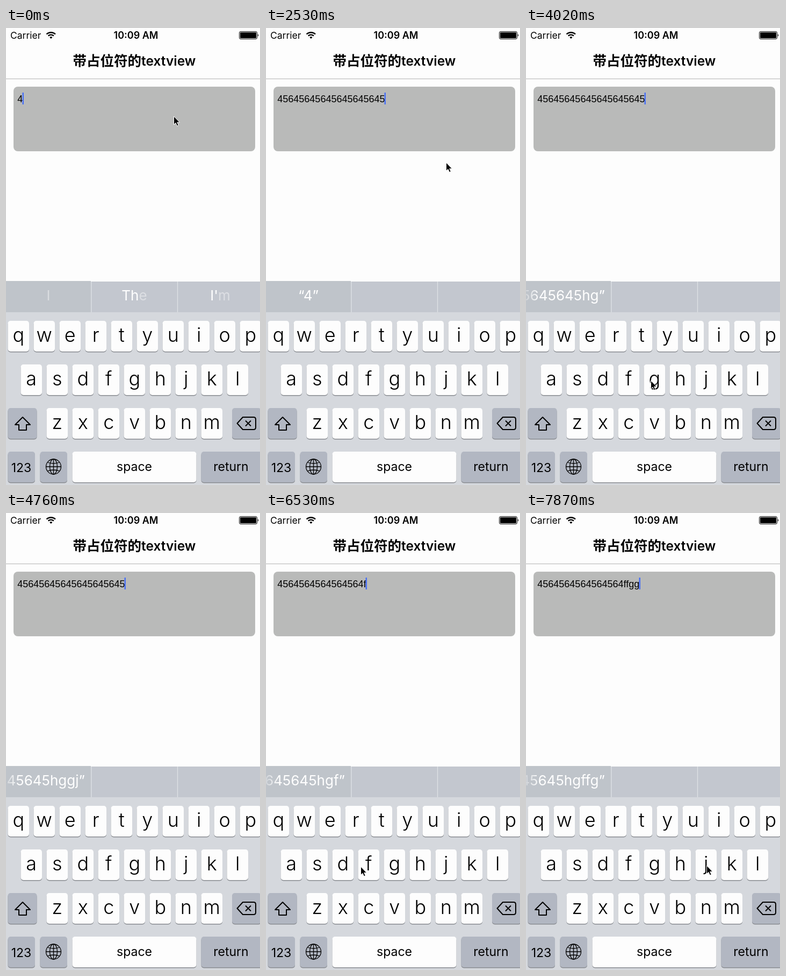
Write an HTML page that moves like this. It is 473 px wide and 849 px high and loops after 8000 ms.

```html
<!DOCTYPE html>
<html lang="zh">
<head>
<meta charset="utf-8">
<title>textview</title>
<style>
html, body { margin: 0; width: 100%; height: 100%; overflow: hidden; background: #fdfdfd }
svg { display: block; font-family: Inter, Roboto, sans-serif }
.key { font-size: 36px; font-weight: 300; text-anchor: middle }
.word { font-size: 23px; text-anchor: middle }
.hint { font-size: 26px; fill: url(#fade) }
.field { font: 18px "Liberation Sans", Arial, sans-serif }
.line { fill: none; stroke: #000; stroke-width: 2; stroke-linejoin: round }
.pop { filter: drop-shadow(0 1px 3px rgba(0, 0, 0, .28)) }
</style>
</head>
<body>
<svg width="473" height="849" viewBox="0 0 473 849">
  <defs>
    <linearGradient id="fade" gradientUnits="userSpaceOnUse" x1="-4" y1="0" x2="24" y2="0">
      <stop offset="0" stop-color="#fff" stop-opacity=".15"/>
      <stop offset="1" stop-color="#fff"/>
    </linearGradient>
  </defs>
  <rect width="473" height="849" fill="#fdfdfd"/>
  <text x="8" y="20" font-size="17.5">Carrier</text>
  <g fill="none" stroke="#000" stroke-width="2.4">
    <path d="M75.5 11.5a12 12 0 0 1 16.500 0M78.600 14.700a7.500 7.500 0 0 1 10.300 0"/>
    <path d="M83.800 20l-2.600-2.800a4 4 0 0 1 5.200 0z" fill="#000" stroke="none"/>
  </g>
  <text x="242" y="20" font-size="18" font-weight="600" text-anchor="middle">10:09 AM</text>
  <rect x="434.500" y="6.500" width="33" height="14" rx="2.500" fill="none" stroke="#000"/>
  <rect x="436" y="8" width="30" height="11" rx="1"/>
  <path d="M469 11q2.500 2.500 0 5z"/>
  <text x="124.500" y="70" font-size="25.500" font-weight="600" style="font-family:'Noto Sans CJK SC','Noto Sans CJK',sans-serif">带占位符的</text>
  <text x="252" y="70" font-size="24.500" font-weight="600">textview</text>
  <path d="M0 94.500H473" stroke="#b3b3b3"/>
  <rect x="14" y="109" width="450" height="120" rx="8" fill="#b9bab9"/>
  <rect y="471" width="473" height="57" fill="#c3c7cf"/>
  <rect y="470" width="158" height="58" fill="#bfc4ca"/>
  <path d="M158.800 471V528M319.500 471V528" stroke="#dfe2e6" stroke-width="1.300"/>
  <rect y="528" width="473" height="321" fill="#d5d8dd"/>
  <g id="keys"></g>
  <g id="live"></g>
</svg>
<script>
const STEP = 148.5, LOOP = 8000;
const GREY = '#b2b7c2', WHITE = '#fdfdfd';
const $ = id => document.getElementById(id);

const label = (s, x, y, cls, extra = '') => `<text class="${cls}" x="${x}" y="${y}" ${extra}>${s}</text>`;
const cap = (x, y, w, fill) =>
  `<rect x="${x}" y="${y + 1.5}" width="${w}" height="57" rx="5" fill="#898c91"/>
   <rect x="${x}" y="${y}" width="${w}" height="57" rx="5" fill="${fill}"/>`;

const keyX = {};
function row(letters, left, y) {
  return [...letters].map((c, i) => {
    const x = left + 48 * i;
    keyX[c] = x + 19.75;
    return cap(x, y, 39.5, WHITE) + label(c, x + 19.75, y + 38.5, 'key');
  }).join('');
}

const eraseKey = pressed => cap(421, 706, 54, pressed ? WHITE : GREY) +
  `<path class="line" d="M430.500 734.500L441 723H461q4 0 4 4V742q0 4-4 4H441z" ${pressed ? 'style="fill:#000"' : ''}/>
   <path class="line" d="M446 729.500l10 10m0-10l-10 10" ${pressed ? 'style="stroke:#fff"' : ''}/>`;

$('keys').innerHTML =
  row('qwertyuiop', 3.5, 544) + row('asdfghjkl', 27.5, 625) + row('zxcvbnm', 75.5, 706) +
  cap(3.5, 706, 54, GREY) + '<path class="line" d="M31 723L45 737H38V747H24V737H17z"/>' +
  eraseKey(false) +
  cap(3.5, 787, 50.5, GREY) + label('123', 28.5, 825, 'word') +
  cap(63.5, 787, 50.5, GREY) +
  `<g class="line" style="stroke-width:1.300"><circle cx="88.500" cy="815" r="14"/>
   <ellipse cx="88.500" cy="815" rx="7" ry="14"/>
   <path d="M88.500 801v28M74.500 815h28M77.500 807q11 4 22 0M77.500 823q11-4 22 0"/></g>` +
  cap(123.5, 787, 231, WHITE) + label('space', 239, 823, 'word') +
  cap(363.5, 787, 115, GREY) + label('return', 419, 823, 'word');

// Each list holds [step, value]; a value lasts until the next entry.
const hints = [
  [0, ["I", "The", "I'm"]], [2, ['“4”']], [18, '45645646”'], [24, '45645645h”'],
  [27, '5645645hg”'], [29, '645645hgg”'], [31, '45645hggj”'], [36, '645645hgg”'],
  [38, '5645645hg”'], [43, '645645hgf”'], [45, '45645hgff”'], [47, '45645hgffg”']
];
const pointer = [
  [0, [312, 164]], [17, [335, 250]], [18, [372, 400]], [19, [385, 530]], [20, [350, 620]],
  [21, [300, 650]], [22, [272, 653]], [25, [245, 655]], [26, [232, 655]], [29, [290, 656]],
  [30, [332, 656]], [32, null], [33, [360, 670]], [34, [415, 712]], [35, [443, 733]],
  [39, [370, 715]], [40, [255, 678]], [41, [176, 657]], [45, [228, 655]], [47, [300, 648]],
  [50, [322, 653]], [51, [336, 655]]
];
const popups = { 23: 'h', 24: 'h', 26: 'g', 28: 'g', 30: 'j', 42: 'f', 44: 'f',
  45: 'g', 47: 'g', 48: 'h', 51: 'j', 52: 'j' };
const typedAt = [43, 44, 46, 47];

const at = (list, n) => list.filter(e => e[0] <= n).pop()[1];

function fieldText(n) {
  const size = n < 35 ? Math.min(20, 1 + Math.round(2.25 * n)) : Math.max(16, 54 - n);
  return '456'.repeat(7).slice(0, size) + 'ffgg'.slice(0, typedAt.filter(s => s <= n).length);
}

function textField(n) {
  const s = fieldText(n);
  const width = [...s].reduce((w, c) => w + (c === 'f' ? 5 : 10), 0);
  return label(s, 21.3, 138, 'field') +
    `<rect x="${20.5 + width}" y="120" width="2.500" height="22" fill="#4870f5" opacity="${n === 22 ? .7 : 1}"/>`;
}

function hintBar(n) {
  const h = at(hints, n);
  if (typeof h === 'string') return label(h, n < 24 ? 138 : 147, 506, 'hint', 'text-anchor="end"');
  return h.map((w, i) => {
    const s = n ? w : `${w.slice(0, -1)}<tspan fill-opacity=".42">${w.slice(-1)}</tspan>`;
    return label(s, 79 + 160 * i, 506, 'hint', 'text-anchor="middle"');
  }).join('');
}

const popup = c => `<g transform="translate(${keyX[c]})">
  <path class="pop" fill="${WHITE}" d="M-29 530.500H29q10 0 10 10V599C39 613 20 614 20 632V678q0 5-5 5H-15q-5 0-5-5V632C-20 614-39 613-39 599V540.500q0-10 10-10z"/>
  ${label(c, 0, 595, 'key', 'style="font-size:54px"')}</g>`;

const arrow = ([x, y]) => `<path transform="translate(${x} ${y})" stroke="#fff" d="M.5 0V15.500L4 12.300L6.600 18L9.200 16.800L6.700 11.300H11.500z"/>`;

let shown = -1;
function frame(now) {
  const n = Math.floor((now % LOOP + 1) / STEP);
  if (n !== shown) {
    shown = n;
    const tip = at(pointer, n);
    $('live').innerHTML = textField(n) + hintBar(n) +
      (n >= 35 && n <= 38 ? eraseKey(true) : '') +
      (popups[n] ? popup(popups[n]) : '') + (tip ? arrow(tip) : '');
  }
  requestAnimationFrame(frame);
}
frame(0);
</script>
</body>
</html>
```
